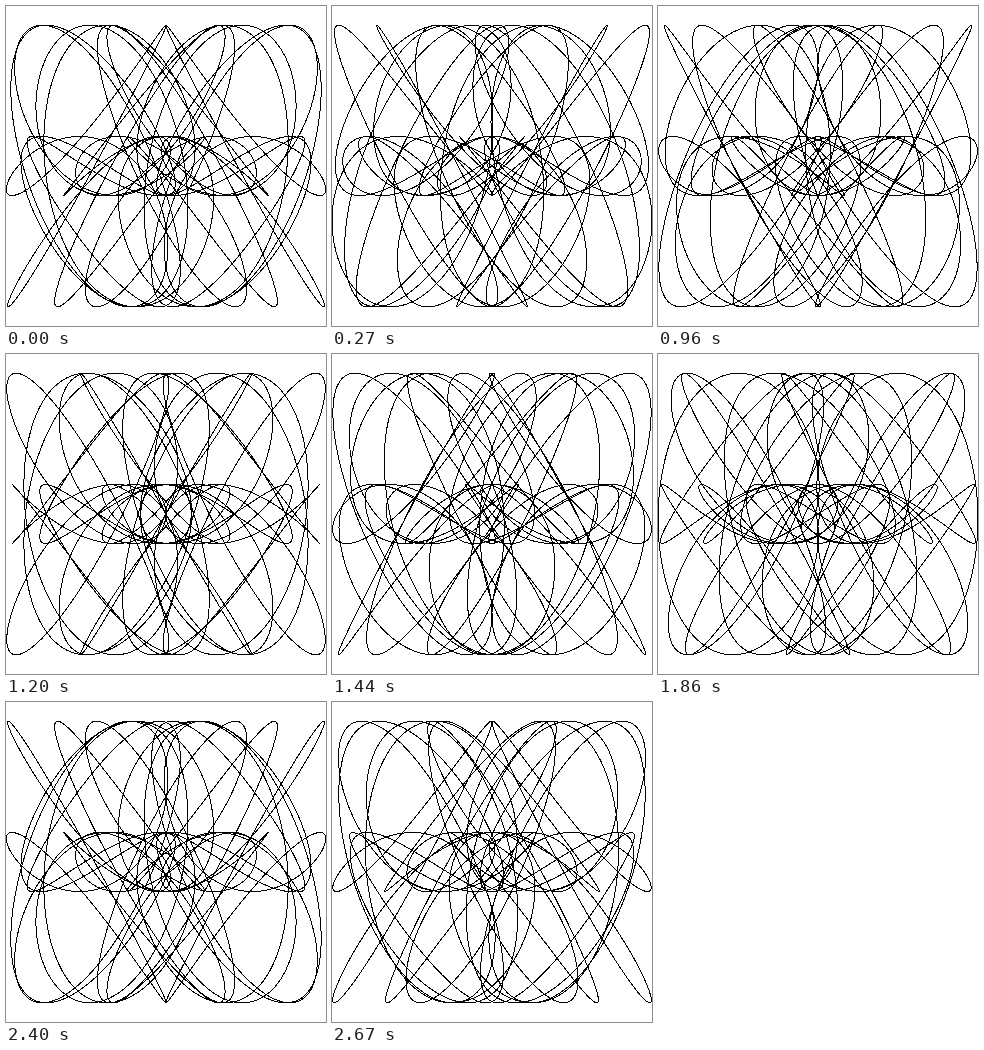
Animation, 320 px wide and 320 px high, one loop 2700 ms. Source, as an HTML page:

```html
<!DOCTYPE html>
<html lang="en">
<head>
<meta charset="utf-8">
<title>Harmonic curve</title>
<style>
  html, body { margin: 0; width: 100%; height: 100%; overflow: hidden; background: #fff; }
  svg { display: block; width: 100vw; height: 100vh; }
</style>
</head>
<body>
<svg viewBox="0 0 320 320">
  <path id="curve" fill="none" stroke="#000" stroke-width="1" stroke-linejoin="round" shape-rendering="crispEdges"/>
</svg>
<script>
const LOOP = 2700, STEP = 30, FRAMES = LOOP / STEP;
const CENTER = 160, AMP = 80, POINTS = 3000, TAU = Math.PI * 2;
const LEAD = 5; // steps the phase is already turned at the start
const curve = document.getElementById('curve');

function trace(phase) {
  let d = '';
  for (let i = 0; i < POINTS; i++) {
    const t = TAU * i / POINTS;
    const x = CENTER + AMP * (Math.sin(t - phase) + Math.sin(23 * t - phase));
    const y = CENTER - AMP * (Math.sin(14 * t) + Math.sin(28 * t));
    d += (i ? 'L' : 'M') + x.toFixed(2) + ' ' + y.toFixed(2);
  }
  return d + 'Z';
}

let shown = -1;
function render(ms) {
  const frame = Math.floor(ms % LOOP / STEP);
  if (frame === shown) return;
  shown = frame;
  curve.setAttribute('d', trace(TAU * (frame + LEAD) / FRAMES));
}

const start = performance.now();
function tick() {
  render(performance.now() - start);
  requestAnimationFrame(tick);
}
render(0);
requestAnimationFrame(tick);
</script>
</body>
</html>
```
